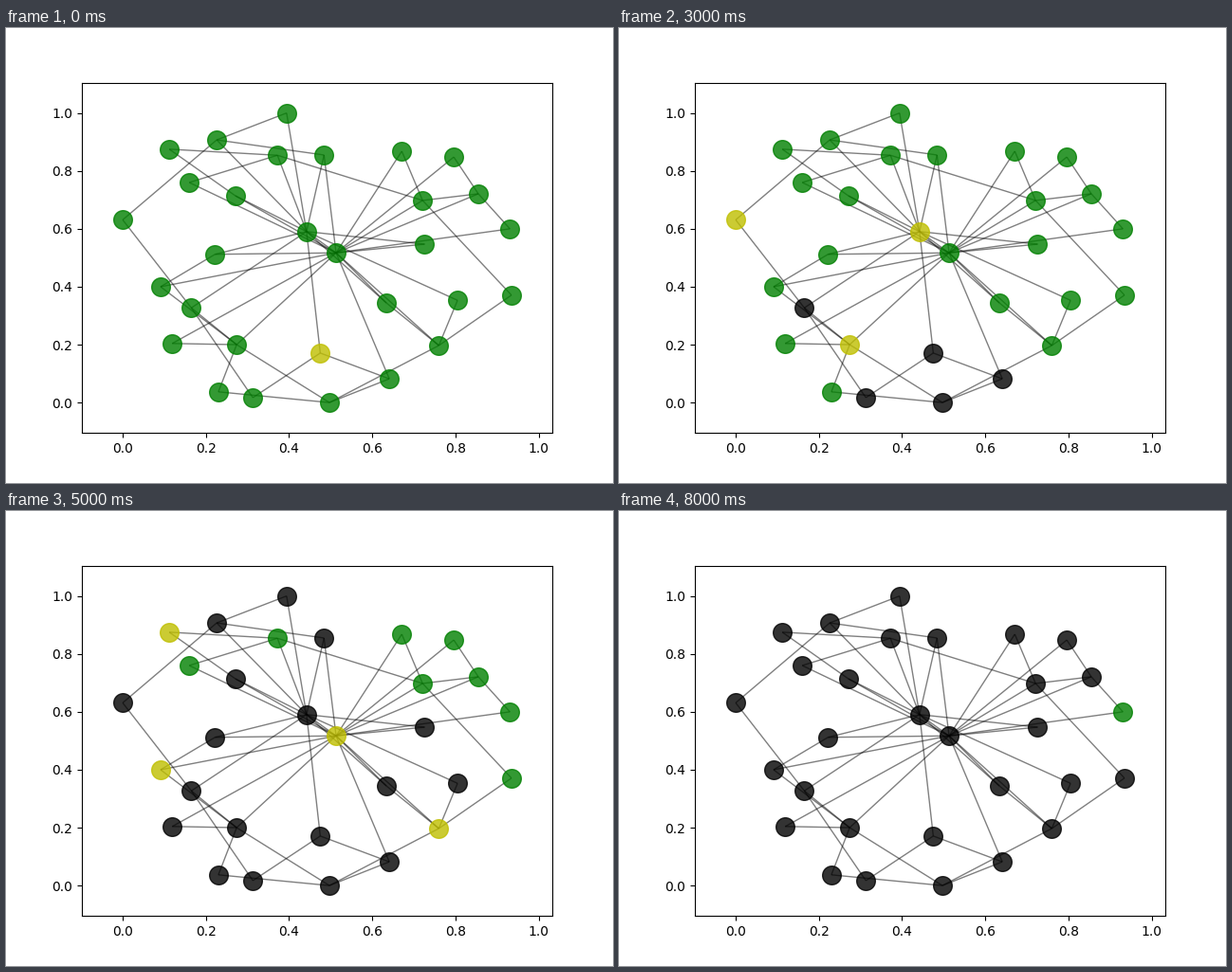
Write a matplotlib script that moves like this. It is 640 px wide and 480 px high and loops after 9 s.

```python
import numpy as np
import matplotlib.pyplot as plt
from itertools import pairwise
from matplotlib.animation import FuncAnimation
from matplotlib.collections import LineCollection

STEPS = 9

# Nodes in the order they are infected; the last one stays healthy.
POS = np.array([
    (.475, .171), (.313, .017), (.641, .082), (.497, 0), (.165, .327),
    (0, .631), (.274, .200), (.442, .5905), (.230, .037), (.394, 1),
    (.226, .907), (.805, .353), (.484, .855), (.271, .714), (.726, .547),
    (.222, .512), (.634, .344), (.119, .204), (.091, .400), (.760, .197),
    (.513, .517), (.112, .875), (.372, .854), (.9347, .371), (.671, .868),
    (.796, .848), (.160, .760), (.721, .698), (.855, .721), (.931, .600),
])

# How many nodes fall ill at each step; each recovers one step later.
WAVE_SIZES = [1, 2, 2, 3, 10, 4, 5, 2, 0, 1]
caught = np.repeat(np.arange(STEPS + 1), WAVE_SIZES)

# Two hubs fan out to most nodes, the rest is joined by walks along the rim.
SPOKES = {
    7: [0, 4, *range(9, 17), 20, 22],
    20: [2, 6, *range(12, 20), *range(24, 30)],
}
WALKS = [
    (9, 10, 5, 4, 1, 0, 2, 3, 19, 23, 27, 22, 21, 13),
    (15, 18, 6, 8, 3, 6, 4),
    (24, 27, 28, 29), (11, 19, 16),
    (25, 28), (17, 6), (10, 12), (22, 26),
]
edges = [(hub, end) for hub, ends in SPOKES.items() for end in ends]
edges += [edge for walk in WALKS for edge in pairwise(walk)]

fig, ax = plt.subplots(figsize=(6.4, 4.8), dpi=100)
right, top = POS.max(axis=0)
ax.set_xlim(-.105 * right, 1.105 * right)
ax.set_ylim(-.105 * top, 1.105 * top)
ax.add_collection(LineCollection(POS[np.array(edges)], colors="k",
                                 linewidths=1, alpha=.5, zorder=1),
                  autolim=False)


def node_layer(color):
    return ax.scatter(*POS.T, s=200, c=color, alpha=.8, linewidths=1,
                      zorder=2)


healthy, infected, removed = map(node_layer, "gyk")


def update(step):
    healthy.set_offsets(POS[caught > step])
    infected.set_offsets(POS[caught == step])
    removed.set_offsets(POS[caught < step])
    return healthy, infected, removed


anim = FuncAnimation(fig, update, frames=STEPS, interval=1000,
                     repeat=True, repeat_delay=0, blit=False)
plt.show()
```
